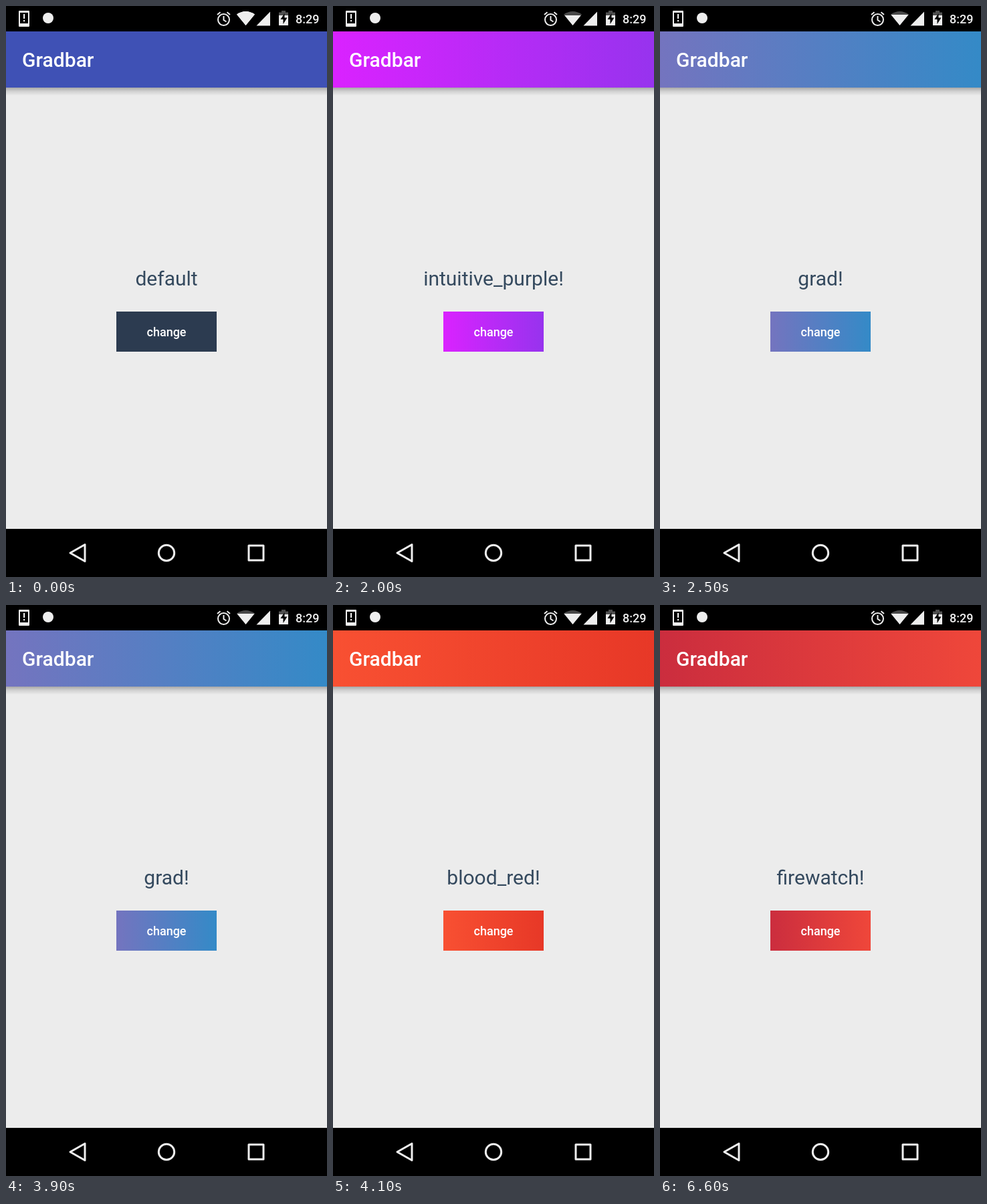
An HTML page for the animation above (8 s loop, 480 px wide and 854 px high).

```html
<!DOCTYPE html>
<html lang="en">
<head>
<meta charset="utf-8">
<title>Gradbar</title>
<style>
  html, body { margin: 0; width: 100%; height: 100%; overflow: hidden; background: #000; }
  svg { display: block; width: 480px; height: 854px; font-family: Roboto, sans-serif; }
  .line { fill: none; stroke: #eee; stroke-width: 3; stroke-linejoin: round; }
  .medium { font-weight: 500; fill: #fff; }
</style>
</head>
<body>
<svg viewBox="0 0 480 854">
  <defs>
    <linearGradient id="fill"><stop/><stop offset="1"/></linearGradient>
    <linearGradient id="shade" x2="0" y2="1">
      <stop stop-opacity=".29"/>
      <stop offset=".45" stop-opacity=".12"/>
      <stop offset="1" stop-opacity="0"/>
    </linearGradient>
    <clipPath id="level"><rect x="340" width="40" height="38"/></clipPath>
  </defs>

  <rect width="480" height="854"/>
  <rect y="38" width="480" height="744" fill="#ececec"/>
  <rect y="122" width="480" height="12" fill="url(#shade)"/>
  <rect y="38" width="480" height="84" fill="url(#fill)"/>
  <text class="medium" x="24" y="91" font-size="30">Gradbar</text>

  <text id="label" x="240" y="418" font-size="30" text-anchor="middle" fill="#34495e"></text>
  <rect id="press" x="164" y="456.5" width="152" height="61" fill="#000" opacity=".14"/>
  <rect x="165" y="457" width="150" height="60" fill="url(#fill)"/>
  <text class="medium" x="240" y="494" font-size="18" text-anchor="middle">change</text>

  <!-- status bar -->
  <g fill="#eee">
    <path fill-rule="evenodd" d="M20 7h14q1 0 1 1v22q0 1-1 1h-14q-1 0-1-1v-22q0-1 1-1zM21 10v16h12v-16z"/>
    <path d="M26 12h2.2v7h-2.2zM26 21h2.2v2.2h-2.2z"/>
    <circle cx="63" cy="18" r="8"/>
    <g fill="none" stroke="#eee" stroke-width="2">
      <circle cx="325.500" cy="20.500" r="8.500"/>
      <path d="M325.500 15v6l4 2.500M316 13l4.500-3.700M335 13l-4.500-3.700"/>
    </g>
    <path id="wifi" d="M345 12.500Q358.500 3.500 372 12.500L358.500 29Z"/>
    <path d="M345 12.500Q358.500 3.500 372 12.500L358.500 29Z" clip-path="url(#level)"/>
    <path d="M374.500 29.500H395V8.500Z"/>
    <path fill="#505050" d="M408 9.500h4v-2.500h6v2.500h4v5h-14z"/>
    <path d="M408 14h14v15h-14z"/>
    <path fill="#000" d="M416.500 11l-6 9h4v7l6-9.500h-4z"/>
    <text class="medium" x="433" y="26" font-size="18" style="fill:#eee">8:29</text>
  </g>

  <!-- navigation bar -->
  <g class="line">
    <path d="M96 818L118 805.500V830.500Z"/>
    <circle cx="240" cy="818" r="11.700"/>
    <rect x="363" y="807" width="22" height="22"/>
  </g>
</svg>
<script>
  const LOOP = 8000;
  const themes = [
    [0, 'default', '#3f51b5', '#3f51b5'],
    [500, 'intuitive_purple!', '#da22ff', '#9733ee'],
    [2100, 'grad!', '#7474bf', '#348ac7'],
    [4000, 'blood_red!', '#f85032', '#e73827'],
    [6500, 'firewatch!', '#cb2d3e', '#ef473a']
  ];
  const $ = s => document.querySelector(s);
  const stops = document.querySelectorAll('#fill stop');
  const button = $('#press + rect');
  const start = performance.now();

  function draw(now) {
    const t = Math.max(0, now - start) % LOOP;
    const [from, name, ...colors] = themes.filter(theme => theme[0] <= t).pop();
    $('#label').textContent = name;
    stops.forEach((stop, i) => stop.setAttribute('stop-color', colors[i]));
    button.setAttribute('fill', from ? 'url(#fill)' : '#2c3b50');
    $('#press').style.display = t >= 500 && t < 600 ? '' : 'none';

    // wifi strength
    const weak = t >= 600;
    $('#wifi').setAttribute('fill', weak ? '#484848' : '#eee');
    $('#level rect').setAttribute('y', !weak ? 0 : t < 2500 ? 14 : 13);
    requestAnimationFrame(draw);
  }
  draw(start);
</script>
</body>
</html>
```
